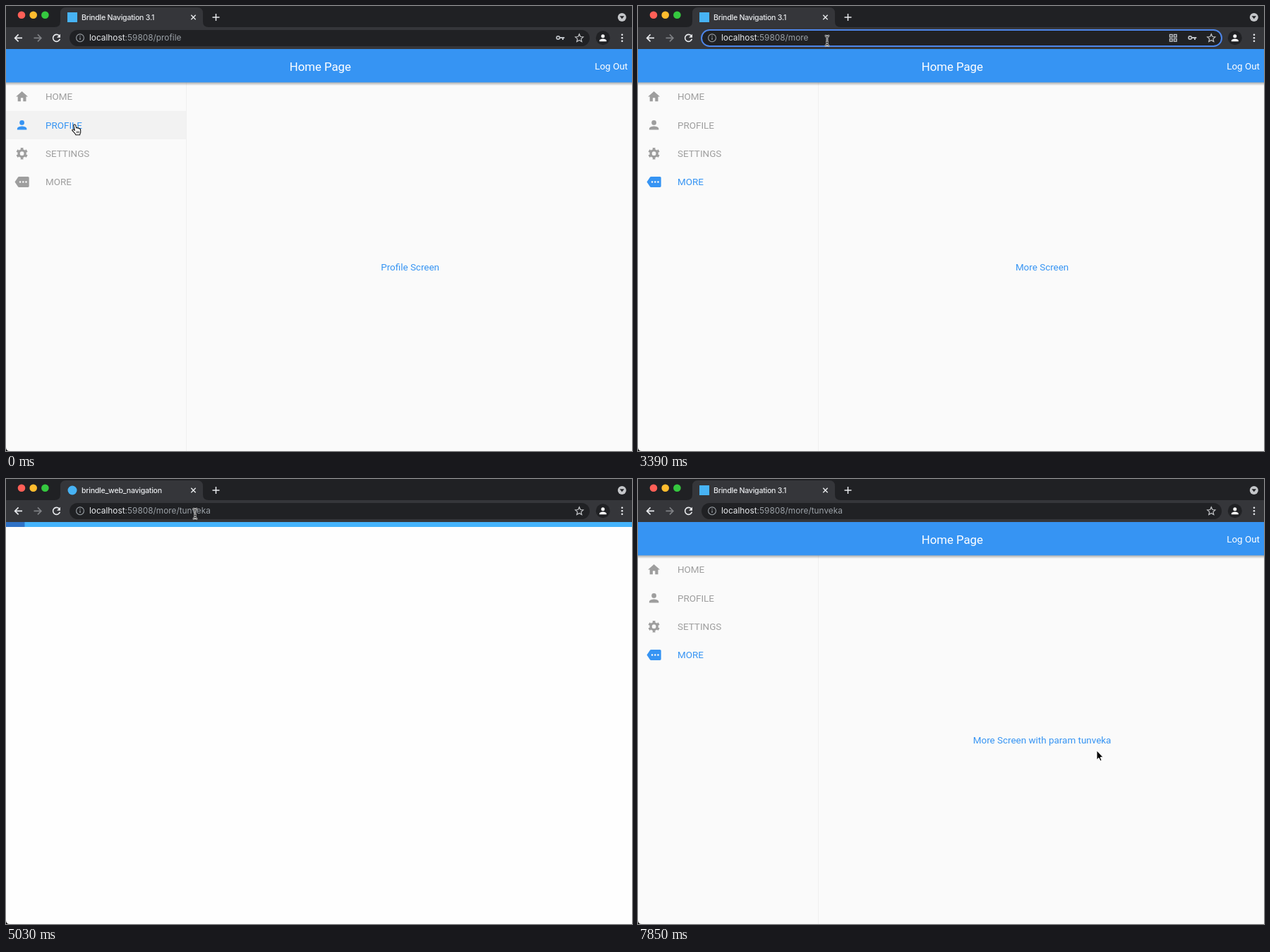
Recreate the animation shown at these times as an HTML page. Size 887x631 px, loop 7.99 s.

```html
<!DOCTYPE html>
<html lang="en">
<head>
<meta charset="utf-8">
<title>Navigation demo</title>
<style>
html, body { margin: 0; width: 100%; height: 100%; overflow: hidden; background: #fff; }
svg { display: block; }
text { font: 13.44px Roboto, sans-serif; white-space: pre; }
.small { font: 500 10.6px Inter, sans-serif; letter-spacing: -.25px; }
.url { font: 11.85px Inter, sans-serif; }
.bold { font-weight: 600; }
</style>
</head>
<body>
<svg id="stage" width="887" height="631" viewBox="0 0 887 631"></svg>
<script>
const LOOP = 7990, STEP = 148, LAST = 53;
const BLUE = '#3694f3', GREY = '#9e9e9e', LIGHT = '#e8eaed', DIM = '#9aa0a6', DARK = '#202124', LINK = '#78a6f5';
const PARAM = 'tunveka', APP = 'Brindle Navigation 3.1';
const stage = document.getElementById('stage');

const rect = (x, y, w, h, fill, more = '') =>
  `<rect x="${x}" y="${y}" width="${w}" height="${h}" fill="${fill}" ${more}/>`;
const circle = (x, y, r, fill, more = '') =>
  `<circle cx="${x}" cy="${y}" r="${r}" fill="${fill}" ${more}/>`;
const text = (x, y, body, fill, more = '') =>
  `<text x="${x}" y="${y}" fill="${fill}" ${more}>${body}</text>`;
const span = (body, fill, cls = '') => `<tspan fill="${fill}" class="${cls}">${body}</tspan>`;
const path = (d, fill, more = '') => `<path d="${d}" fill="${fill}" ${more}/>`;
const line = (d, color, width = 1.5) => path(d, 'none', `stroke="${color}" stroke-width="${width}"`);
const group = (x, y, body, scale = 1) =>
  `<g transform="translate(${x} ${y}) scale(${scale})">${body}</g>`;
const cross = (x, y, r, color) =>
  line(`M${x - r} ${y - r}l${2 * r} ${2 * r}m0 ${-2 * r}l${-2 * r} ${2 * r}`, color, 1.4);

// Icons on a 24 unit grid
const person = c => circle(12, 8, 4, c) + path('M12 14c-2.67 0-8 1.34-8 4v2h16v-2c0-2.66-5.33-4-8-4z', c);
const icons = [
  c => path('M10 20v-6h4v6h5v-8h3L12 3 2 12h3v8z', c),
  person,
  c => circle(12, 12, 5.4, 'none', `stroke="${c}" stroke-width="4"`) +
    circle(12, 12, 8, 'none', `stroke="${c}" stroke-width="3.6" pathLength="12" stroke-dasharray="1 1" stroke-dashoffset="-.5"`),
  c => path('M22 3H7c-.7 0-1.2.35-1.6.9L0 12l5.4 8.1c.4.5.9.9 1.6.9h15c1.1 0 2-.9 2-2V5c0-1.1-.9-2-2-2z', c) +
    [9, 14, 19].map(x => circle(x, 12, 1.5, '#fafafa')).join('')
];
const icon = (draw, x, y, color, size = 20.2) => group(x - size / 2, y - size / 2, draw(color), size / 24);
const rows = ['HOME', 'PROFILE', 'SETTINGS', 'MORE'];
const rowTop = i => 108.4 + 40.3 * i;

// Pointer: step, x, y, eased between
const route = [[0, 98, 168], [3, 94, 207], [4, 94, 207], [6, 89, 246], [8, 89, 246], [13, 268, 49],
  [41, 268, 49], [43, 238, 72], [48, 579, 435], [53, 650, 385]];

function pointerAt(k) {
  const i = Math.max(1, route.findIndex(p => p[0] >= k));
  const [a, ax, ay] = route[i - 1], [b, bx, by] = route[i];
  const u = (k - a) / (b - a), e = u * u * (3 - 2 * u);
  return [ax + (bx - ax) * e, ay + (by - ay) * e];
}

const cursors = {
  arrow: path('M0 0V13.2L3 10.5 5 15 7.1 14.1 5.2 9.7H9.2Z', '#000', 'stroke="#fff" stroke-width="1"'),
  beam: ['#fff', '#222'].map((c, i) =>
    line('M-3.2-6.8Q0-6.8 0-4.8Q0-6.8 3.2-6.8M0-5V6M-3.2 7.2Q0 7.2 0 5.2Q0 7.2 3.2 7.2M-1.8 2.5H1.8', c, i ? 1 : 2.6)).join(''),
  hand: group(-5, -1, path('M3.4 1.3c1-.8 2.2 0 2.4 1l.7 3.6c1-.6 1.8-.4 2.2.3.9-.4 1.8-.1 2.1.8 1-.2 1.8.4 1.8 1.4l.1 3.3c0 1.5-.9 2.2-1.1 4H6c-.7-2-3-4-5.1-6.2-.5-1.2.9-2 2-1.2l1.4 1L2.9 2.8c-.2-.6 0-1.1.5-1.5z',
    '#fff', 'stroke="#111" stroke-width="1.1"') + line('M7.2 10.5v2.8M8.8 10.5v2.8M10.3 10.5v2.8', '#222', .8))
};

function app(k, left, hover) {
  const page = k < 3 ? 1 : k < 6 ? 2 : 3;
  const label = ['', 'Profile Screen', 'Settings Screen', 'More Screen'][page] + (k > 41 ? ' with param ' + PARAM : '');
  const menu = rows.map((name, i) => {
    const y = rowTop(i) + 20.15, color = i === page ? BLUE : GREY;
    return (i === hover ? rect(0, rowTop(i), 255, 40.3, '#f2f2f2') : '') +
      icon(icons[i], 22.6, y, color) + text(56, y + 4.9, name, color);
  }).join('');
  return group(left, 0,
    (left ? rect(-30, 61, 30, 570, 'url(#edge)') : '') +
    rect(0, 61, 887, 570, '#fafafa') + menu + rect(255, 108, 1, 523, '#efefef') +
    rect(0, 108, 887, 5, 'url(#drop)') + rect(0, 61, 887, 47.3, BLUE) +
    text(445.3, 91.7, 'Home Page', '#fff', 'text-anchor="middle" style="font-size:16.8px"') +
    text(881, 90, 'Log Out', '#fff', 'text-anchor="end"') +
    text(572.6, 374.7, label, BLUE, 'text-anchor="middle"'));
}

function loader(k) {
  if (k > 39) return '';
  const done = 887 * ((k - 33) / 6) ** 1.96;
  return rect(0, 61, 887, 7, '#45b3fb') + rect(0, 61, done, 7, '#2f72c6');
}

function tabStrip(k) {
  const loading = k > 32 && k < 42;
  return rect(0, 0, 887, 31, DARK) + rect(0, 30, 887, 31, '#35363a') +
    path('M69 30q8 0 8-8V10q0-8 8-8H271q8 0 8 8V22q0 8 8 8z', '#35363a') +
    ['#ff5f57', '#febc2e', '#35c83f'].map((c, i) => circle(22 + 16.7 * i, 12.8, 5.3, c)).join('') +
    (k > 32 && k < 38 ? circle(94, 16, 6.5, '#47b3f5') : rect(87, 9, 14, 14, '#47b3f5')) +
    text(107, 19.7, loading ? 'brindle_web_navigation' : APP, LIGHT, 'class="small"') +
    cross(265.5, 16, 3.2, LIGHT) + line('M292.5 16h10m-5-5v10', LIGHT) +
    circle(872.8, 16, 6, '#c4c6c9') + path('M869.6 14.3h6.4l-3.2 4z', DARK);
}

function address(k) {
  const focused = k > 12 && k < 25, selected = focused && k < 19;
  const where = k < 3 ? 'profile' : k < 6 ? 'settings' : k < 31 ? 'more' : 'more/' + PARAM;
  return rect(90, 34, 737, 23, DARK, `rx="11.5" ${focused ? 'stroke="#4d86ea" stroke-width="2"' : ''}`) +
    circle(105, 45.3, 5.4, 'none', `stroke="${DIM}" stroke-width="1.1"`) + line('M105 44.5v3.6M105 42v1.3', DIM, 1.2) +
    (selected ? rect(118, 38, 124, 15, '#41668f') : '') +
    text(118, 49.4, span('localhost', LIGHT) + span(':59808/' + where, selected ? LIGHT : DIM), DIM, 'class="url"') +
    (k > 18 && k < 23 ? rect(241, 38, 1, 14, '#fff') : '') +
    (k > 12 && k < 31 ? [0, 1, 2, 3].map(i =>
      rect(753.5 + 6 * (i % 2), 40.5 + 6 * (i >> 1), 3.6, 3.6, 'none', 'stroke="#bdc1c6" stroke-width="1.4"')).join('') : '') +
    (k < 33 ? circle(782.3, 45, 2.2, 'none', 'stroke="#bdc1c6" stroke-width="1.7"') + line('M785 45h6.3M789 45v3', '#bdc1c6', 2) : '') +
    path('M812.3 39.8l1.6 3.7 4 .4-3 2.7.9 4-3.5-2.1-3.5 2.1.9-4-3-2.7 4-.4z', 'none', 'stroke="#c4c6c9" stroke-width="1.2"');
}

function toolbar(k) {
  return line('M23 45.4H12.8M17.6 40.4l-5 5 5 5', LIGHT, 1.6) + line('M39.5 45.4H49.7M44.9 40.4l5 5-5 5', '#7f8185', 1.6) +
    line('M75.4 42.1A5 5 0 1 0 76.4 46.8', LIGHT, 1.6) + path('M77 39.8v5h-5z', LIGHT) +
    address(k) +
    circle(845.8, 45.3, 10, DARK) + icon(person, 845.8, 45.3, '#fff', 15) +
    [40.8, 45.3, 49.8].map(y => circle(873, y, 1.3, LIGHT)).join('');
}

function suggestions() {
  const base = 'localhost:59808/more/', mark = y => rect(98.5, y - 6.5, 13, 13, '#47b3f5');
  const row = (y, body) => text(128, y + 4.2, body, LIGHT, 'class="url"');
  return rect(85, 30, 747, 128, DARK, 'rx="6" filter="url(#soft)"') +
    rect(85, 60.5, 747, 30.3, '#3a3b3f') + rect(85, 60.5, 2.5, 30.3, '#4577d0') +
    mark(45.3) + mark(75.6) +
    rect(254, 38, 45, 14.5, '#41668f') +
    row(45.2, span('localhost', LIGHT) + span(':59808/more/', DIM) + span(PARAM, '#fff')) +
    row(75.6, APP + span(' - ', DIM) + span(base, LINK, 'bold') + span(PARAM, LINK)) +
    cross(815.5, 75.7, 3.8, '#c4c6c9') +
    row(106, base + span(' - Wendlo Search', DIM)) +
    circle(103.8, 104.5, 3.4, 'none', `stroke="${DIM}" stroke-width="1.3"`) + line('M106.3 107l4 4', DIM, 1.4) +
    row(136.2, span(base, LINK, 'bold')) +
    circle(105, 136.3, 5.6, '#bdc1c6') + path('M101 134l3 .5 1 2-2 1.5v3l-3-3zM106 131.5l3.5 2-2.5 2.5-2-1.5zM107 138h2.5l-2 3z', DARK);
}

const defs = `<defs>
  <linearGradient id="edge"><stop offset="0" stop-opacity="0"/><stop offset=".33" stop-opacity=".04"/>
    <stop offset=".66" stop-opacity=".12"/><stop offset="1" stop-opacity=".42"/></linearGradient>
  <linearGradient id="drop" x2="0" y2="1"><stop stop-opacity=".32"/><stop offset="1" stop-opacity="0"/></linearGradient>
  <filter id="soft" x="-5%" y="-20%" width="110%" height="150%">
    <feDropShadow dx="0" dy="4" stdDeviation="4" flood-opacity=".3"/></filter>
</defs>`;

function scene(k) {
  const [x, y] = pointerAt(k);
  const menuOpen = k > 24 && k < 31, shown = k < 33 || k > 41;
  const slide = Math.min(1, Math.max(0, (k - 41.7) / 3.4));
  const left = k > 41 ? Math.round(887 * (1 - slide) ** 3.78) : 0;
  const inMenu = shown && x < left + 255 && x > left && y > 108.4 && y < rowTop(4);
  const hover = inMenu ? Math.floor((y - 108.4 + 4) / 40.3) : -1;
  const kind = inMenu ? 'hand' : y < 58 && !(menuOpen && k > 25) ? 'beam' : 'arrow';
  return defs + rect(0, 61, 887, 570, '#fefefe') +
    (shown ? app(k, left, hover) : loader(k)) +
    tabStrip(k) + toolbar(k) + (menuOpen ? suggestions() : '') +
    (k > 40 && k < 47 ? path('M0 614H291q4 0 4 4V631H0z', '#6a6a6a') +
      text(3, 626.6, 'Waiting for localhost...', '#dedede', 'class="small" style="font-weight:400"') : '') +
    path('M0 626q0 5 5 5H0z', '#000') + group(x, y, cursors[kind]);
}

let shownStep = -1;
function tick(now) {
  const k = Math.min(LAST, Math.floor((now % LOOP + 24) / STEP));
  if (k !== shownStep) stage.innerHTML = scene(shownStep = k);
  requestAnimationFrame(tick);
}
tick(performance.now());
</script>
</body>
</html>
```
